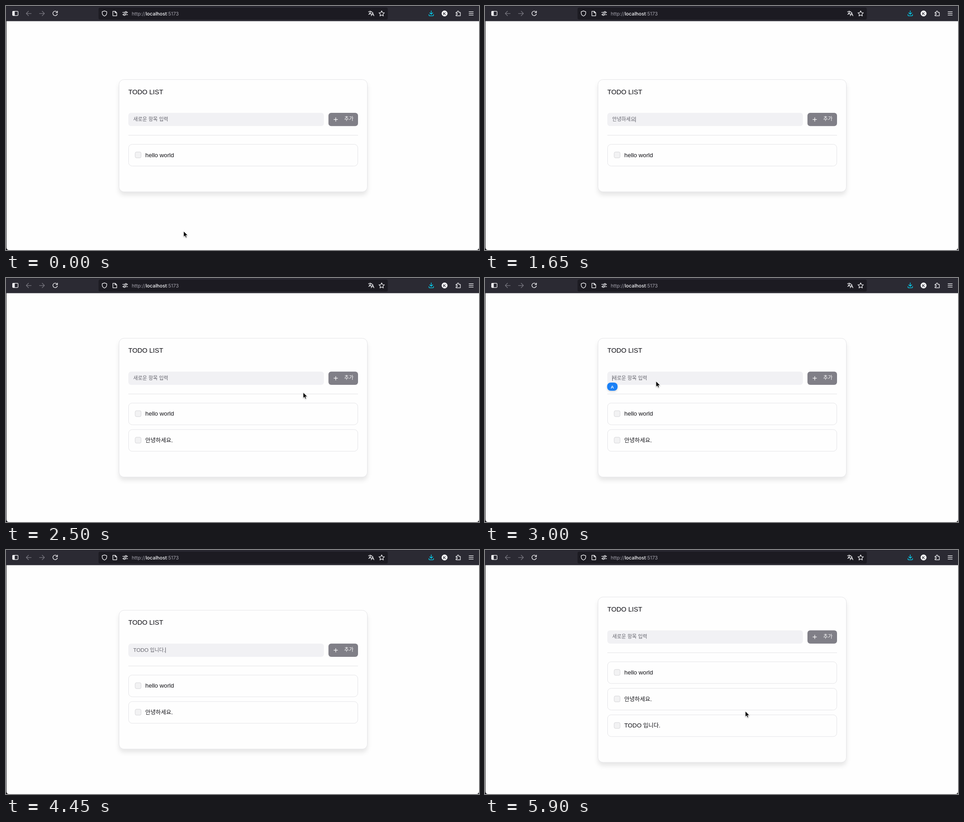
An HTML page for the animation above (5.95 s loop, 1040 by 539 pixels).

```html
<!DOCTYPE html>
<html lang="ko">
<head>
<meta charset="utf-8">
<title>TODO LIST</title>
<style>
  html, body { margin: 0; width: 100%; height: 100%; overflow: hidden; background: #1c1b22; }
  svg { display: block; }
  text { font-family: "Liberation Sans", Arial, "Noto Sans CJK KR", sans-serif; white-space: pre; }
  .ko { font-family: "Noto Sans CJK KR", "Noto Sans CJK JP", "Noto Sans CJK", sans-serif; font-size: .94em; }
  .url { font: 10.7px Inter, Roboto, sans-serif; fill: #a5a4ae; }
  .icon { fill: none; stroke: #fbfbfe; stroke-width: 1.25; stroke-linecap: round; stroke-linejoin: round; }
  .dim { stroke: #77767f; }
  .panel { fill: #fefefe; stroke: #e4e4e7; }
  .card { filter: drop-shadow(0 7px 5px rgba(0, 0, 0, .09)); }
  .check { fill: #f2f2f3; stroke: #d6d6d9; }
</style>
</head>
<body>
<svg width="1040" height="539" viewBox="0 0 1040 539">
  <rect width="1040" height="539" fill="#111116"/>
  <path d="M1 33H1040V533Q1040 539 1034 539H7Q1 539 1 533Z" fill="#fefefe"/>
  <rect width="1040" height="33.5" fill="#2b2a33"/>
  <rect width="1040" height="1" fill="#1f1e26"/>
  <rect x="203.5" y="3.5" width="636" height="26.5" rx="4" fill="#1c1b22"/>

  <g class="icon">
    <rect x="14.5" y="11.5" width="12" height="9.5" rx="1.5"/>
    <path d="M15 12h3.5v8.5H15z" fill="#fbfbfe"/>
    <path class="dim" d="M55.5 16.5H44.5M49.5 11.5l-5 5 5 5M73.5 16.5h11M79.500 11.500l5 5-5 5"/>
    <path d="M112.300 13.500A5 5 0 1 0 113 17.500M113.200 11v3.500h-3.500"/>
    <path d="M216.500 10.800L221.500 12.600V15.500C221.500 19 219.500 21 216.500 22.300C213.500 21 211.500 19 211.500 15.500V12.600Z"/>
    <path d="M235 11.500h5l3.500 3.500v6.500h-8.500zM239.800 11.700v3.500h3.500"/>
    <path d="M256.500 14h5M265.800 14h1.700M256.500 19h1.700M262.500 19h5"/>
    <circle cx="263.700" cy="14" r="1.900"/><circle cx="260.300" cy="19" r="1.900"/>
    <path d="M797 12.300h7.500M800.700 10.800v1.500M803 12.500C802 15.500 800 17.500 797.300 18.700M798.700 14.500C799.500 16.300 801 17.600 802.600 18.300M803 21.700l3-7.700 3 7.700M804.200 19.400h3.700"/>
    <path d="M826 10.700l1.800 3.800 4.200.5-3.100 2.900.8 4.100-3.700-2-3.700 2 .8-4.100-3.100-2.900 4.200-.5z"/>
    <path d="M935 10.500v7.500M931.700 15l3.300 3.300 3.300-3.300M930 18.500v2q0 1.200 1.200 1.200h7.600q1.200 0 1.200-1.200v-2" stroke="#00ddff"/>
    <path d="M989.500 14h2.700v-1.200a1.700 1.700 0 0 1 3.400 0V14h3.400v7.500h-9.500v-2.200h1.300a1.600 1.600 0 0 0 0-3.200h-1.300z"/>
    <path d="M1018 12.500h9.500M1018 16.300h9.500M1018 20.100h9.500"/>
  </g>
  <circle cx="964.300" cy="16.500" r="6.500" fill="#fbfbfe"/>
  <text x="964.300" y="19.900" font-size="9" font-weight="bold" text-anchor="middle" fill="#2b2a33">K</text>
  <text class="url" x="276.500" y="20.800">http://<tspan fill="#fbfbfe" font-weight="500">localhost</tspan>:5173</text>

  <g id="app"></g>
  <rect id="caret" width="1" height="12" fill="#55555e"/>
  <g id="badge">
    <rect x="-11.500" y="-9" width="23" height="18" rx="8" fill="#1a80f6" style="filter:drop-shadow(0 2px 2px rgba(0,0,0,.15))"/>
    <text id="mode" y="3.600" font-size="9.500" font-weight="bold" text-anchor="middle" fill="#fff"></text>
  </g>
  <path id="mouse" d="M0 0V12.600L2.900 9.900L4.900 14.300L7 13.400L5.100 9.200H9.200Z" fill="#000" stroke="#fff" stroke-width=".9" style="filter:drop-shadow(0 1px 1px rgba(0,0,0,.25))"/>
</svg>

<script>
const LOOP = 5950, STEP = 50, ROW = 58.6;
const ITEMS = ["hello world", "안녕하세요.", "TODO 입니다."];
const ADDED = [2450, 4950];
const HINT = "새로운 항목 입력";

// [time, x, y]
const PATH = [
  [0, 390.5, 497.5], [350, 354.5, 254], [2000, 354.5, 254], [2350, 745.5, 257],
  [2450, 745.5, 257], [2600, 390, 241], [2800, 376, 228], [4650, 376, 228],
  [4900, 749.5, 223.5], [5200, 749.5, 223.5], [5750, 577.5, 352.5],
  [5800, 577.5, 352.5], [5900, 572.3, 356]
];

// [time, field content]
const TYPING = [
  [0, ""], [1150, "ㅇ"], [1200, "아"], [1350, "안"], [1400, "안녀"], [1450, "안녕"],
  [1500, "안녕하"], [1550, "안녕핫"], [1600, "안녕하세"], [1650, "안녕하세요"],
  [1800, "안녕하세요."], [2450, ""], [3100, "T"], [3150, "TO"], [3200, "TOD"],
  [3450, "TODO"], [3750, "TODO "], [3900, "TODO ㅇ"], [3950, "TODO 이"],
  [4000, "TODO 입"], [4100, "TODO 입ㄴ"], [4150, "TODO 입니"], [4300, "TODO 입닏"],
  [4350, "TODO 입니다"], [4450, "TODO 입니다."], [4950, ""]
];

const el = id => document.getElementById(id);
const within = (t, ...spans) => spans.some(([a, b]) => t >= a && t < b);
const clamp = v => Math.max(0, Math.min(1, v));
const ease = u => u * u * (3 - 2 * u);
const show = (node, on) => node.setAttribute("visibility", on ? "visible" : "hidden");

function text(x, y, size, fill, str, extra = "") {
  const runs = str.replace(/[ㄱ-힣](?:[ㄱ-힣 ]*[ㄱ-힣])?/g, s => `<tspan class="ko">${s}</tspan>`);
  return `<text x="${x}" y="${y}" font-size="${size}" fill="${fill}" ${extra}>${runs}</text>`;
}

function row(label, i) {
  const y = 305.5 + i * ROW;
  return `<rect class="panel" x="269.5" y="${y}" width="504" height="48" rx="8"/>
    <rect class="check" x="284" y="${y + 17}" width="13" height="13" rx="3"/>` +
    text(306.3, y + 28.3, 13.2, "#111116", label);
}

function app(count, value, hover) {
  const extra = count - 1;
  return `<g transform="translate(0 ${-29.3 * extra})">
    <rect class="panel card" x="248.5" y="162.5" width="546" height="${248 + ROW * extra}" rx="11"/>
    ${text(269, 194.6, 14.6, "#0c0c12", "TODO LIST")}
    <rect x="269" y="236" width="430" height="29.3" rx="6" fill="#f1f1f4"/>
    ${text(279.8, 254, 11.7, "#65656e", value || HINT, 'id="field"')}
    <rect x="709" y="236" width="65" height="29.3" rx="6" fill="${hover ? "#02000f" : "#807f87"}"/>
    <path d="M720.5 250.700h9M725 246.200v9" stroke="#fff" stroke-width="1.200"/>
    ${text(743.8, 253.4, 11.7, "#fff", "추가")}
    <path d="M269 285.500H774" stroke="#e2e2e5"/>
    ${ITEMS.slice(0, count).map(row).join("")}
  </g>`;
}

function pointer(t) {
  const i = Math.max(1, PATH.findIndex(p => p[0] >= t));
  const [t0, x0, y0] = PATH[i - 1], [t1, x1, y1] = PATH[i];
  const u = ease(clamp((t - t0) / (t1 - t0)));
  return [x0 + (x1 - x0) * u, y0 + (y1 - y0) * u];
}

let last = "";
function draw(t) {
  const count = 1 + ADDED.filter(a => t >= a).length;
  const value = TYPING.filter(k => k[0] <= t).pop()[1];
  const hover = within(t, [2300, 2500], [4850, 5100]);
  const shift = -29.3 * (count - 1);

  const key = [count, value, hover].join();
  if (key !== last) el("app").innerHTML = app(count, value, hover);
  last = key;

  show(el("caret"), within(t, [1150, 2350], [2750, 4900]));
  el("caret").setAttribute("x", 279.8 + (value ? el("field").getComputedTextLength() : 0));
  el("caret").setAttribute("y", 244.6 + shift);

  const korean = t < 2000;
  const level = korean
    ? Math.min(clamp((t - 775) / 115), clamp((1200 - t) / 100))
    : t < 3000 ? 0 : clamp((3200 - t) / 150);
  show(el("badge"), level > 0);
  el("badge").setAttribute("opacity", level);
  el("badge").setAttribute("transform", `translate(280 ${269.3 + shift}) scale(${.7 + .3 * level})`);
  el("mode").textContent = korean ? "한" : "A";
  el("mode").setAttribute("class", korean ? "ko" : "");

  show(el("mouse"), !within(t, [1150, 2050], [3100, 4700]));
  el("mouse").setAttribute("transform", `translate(${pointer(t)})`);
}

const start = performance.now();
function tick() {
  const t = (performance.now() - start) % LOOP;
  draw(Math.floor(t / STEP) * STEP);
  requestAnimationFrame(tick);
}
tick();
</script>
</body>
</html>
```
